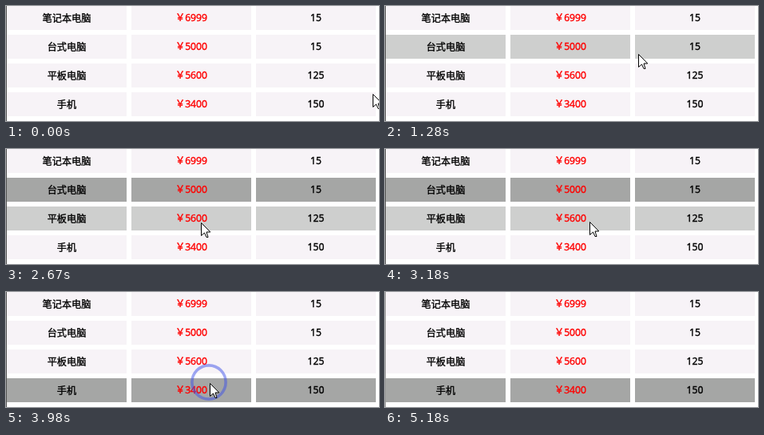
Recreate the animation shown at these times as an HTML page with a canvas. Size 467 by 144 pixels, loop 5340 ms.

```html
<!DOCTYPE html>
<html lang="zh">
<head>
<meta charset="utf-8">
<title>Table row selection</title>
<style>
  html, body { margin: 0; width: 100%; height: 100%; overflow: hidden; background: #fff; }
  canvas { display: block; }
</style>
</head>
<body>
<canvas id="stage" width="467" height="144"></canvas>
<script>
const ctx = document.getElementById('stage').getContext('2d');
const LOOP = 5340, ENTER = 120, LEAVE = 5180;
const CELL = { w: 150, h: 30, left: 1, pitchX: 156, pitchY: 36 };
const COLOR = { plain: '#f7f3f7', hover: '#cecfce', picked: '#a5a6a5' };

const rows = [
  ['笔记本电脑', '￥6999', '15'],
  ['台式电脑', '￥5000', '15'],
  ['平板电脑', '￥5600', '125'],
  ['手机', '￥3400', '150']
];

// Pointer moves: start, end, destination x, y; it rests in between
const home = [459, 110];
const moves = [
  [840, 1280, 317, 60],
  [1900, 2130, 221, 56],
  [2480, 2820, 260, 116],
  [3070, 3180, 256, 91],
  [3450, 3580, 255, 114],
  [4370, 4420, 268, 67],
  [4470, 4780, 286, 69]
];
const presses = [2380, 3380, 3870, 4270];
const PICK_DELAY = 70, RIPPLE = 190;

const ease = p => p * p * (3 - 2 * p);
const progress = (t, from, to) => Math.min(1, Math.max(0, (t - from) / (to - from)));

function pointerAt(t) {
  let [x, y] = home;
  for (const [from, to, toX, toY] of moves) {
    const p = ease(progress(t, from, to));
    x += (toX - x) * p;
    y += (toY - y) * p;
  }
  return [Math.round(x), Math.round(y)];
}

// Gaps between cells do not count as part of a row
function rowUnder(x, y) {
  const inCell = (x - CELL.left) % CELL.pitchX < CELL.w && y % CELL.pitchY < CELL.h;
  return inCell ? Math.floor(y / CELL.pitchY) : -1;
}

function pickedAt(t) {
  const last = presses.map(at => at + PICK_DELAY).filter(at => at <= t).pop();
  return last ? rowUnder(...pointerAt(last)) : -1;
}

function drawText(text, x, y, color) {
  ctx.fillStyle = ctx.strokeStyle = color;
  ctx.lineWidth = 0.35;
  ctx.fillText(text, x, y);
  ctx.strokeText(text, x, y);
}

function drawTable(hover, picked) {
  ctx.font = '12.2px "Noto Sans", "Noto Sans CJK SC", "Noto Sans CJK", sans-serif';
  ctx.textAlign = 'center';
  rows.forEach((row, r) => {
    const y = r * CELL.pitchY;
    const fill = r === picked ? COLOR.picked : r === hover ? COLOR.hover : COLOR.plain;
    row.forEach((text, c) => {
      const x = CELL.left + c * CELL.pitchX;
      ctx.fillStyle = fill;
      ctx.fillRect(x, y, CELL.w, CELL.h);
      drawText(text, x + CELL.w / 2, y + (c ? 19 : 20), c === 1 ? '#f00' : '#000');
    });
  });
}

function drawRipple(x, y, age) {
  const p = progress(age, 0, 155);
  const width = 5 - 2 * p;
  ctx.strokeStyle = `rgba(60, 80, 230, ${0.58 - 0.12 * p})`;
  ctx.lineWidth = width;
  ctx.beginPath();
  ctx.arc(x - 1, y - 1, 5 + 25 * p - width / 2, 0, Math.PI * 2);
  ctx.stroke();
}

const arrow = new Path2D('M0 0V16L4 12.5 6.5 18H8.5L6.5 11.5H11.3Z');

function drawPointer(x, y) {
  ctx.save();
  ctx.translate(x + 0.5, y + 0.5);
  ctx.fillStyle = '#fff';
  ctx.strokeStyle = '#000';
  ctx.lineWidth = 1;
  ctx.lineJoin = 'round';
  ctx.fill(arrow);
  ctx.stroke(arrow);
  ctx.restore();
}

function draw(t) {
  const [x, y] = pointerAt(t);
  const present = t < LEAVE;
  const hover = present && t >= ENTER ? rowUnder(x, y) : -1;

  ctx.fillStyle = '#fff';
  ctx.fillRect(0, 0, 467, 144);
  ctx.fillStyle = present ? '#555' : '#999';
  ctx.fillRect(0, 0, 1, 144);
  drawTable(hover, pickedAt(t));

  const press = presses.find(at => t >= at && t < at + RIPPLE);
  if (press !== undefined) drawRipple(x, y, t - press);
  if (present) drawPointer(x, y);
}

const start = performance.now();
function tick() {
  draw((performance.now() - start) % LOOP);
  requestAnimationFrame(tick);
}
tick();
</script>
</body>
</html>
```
